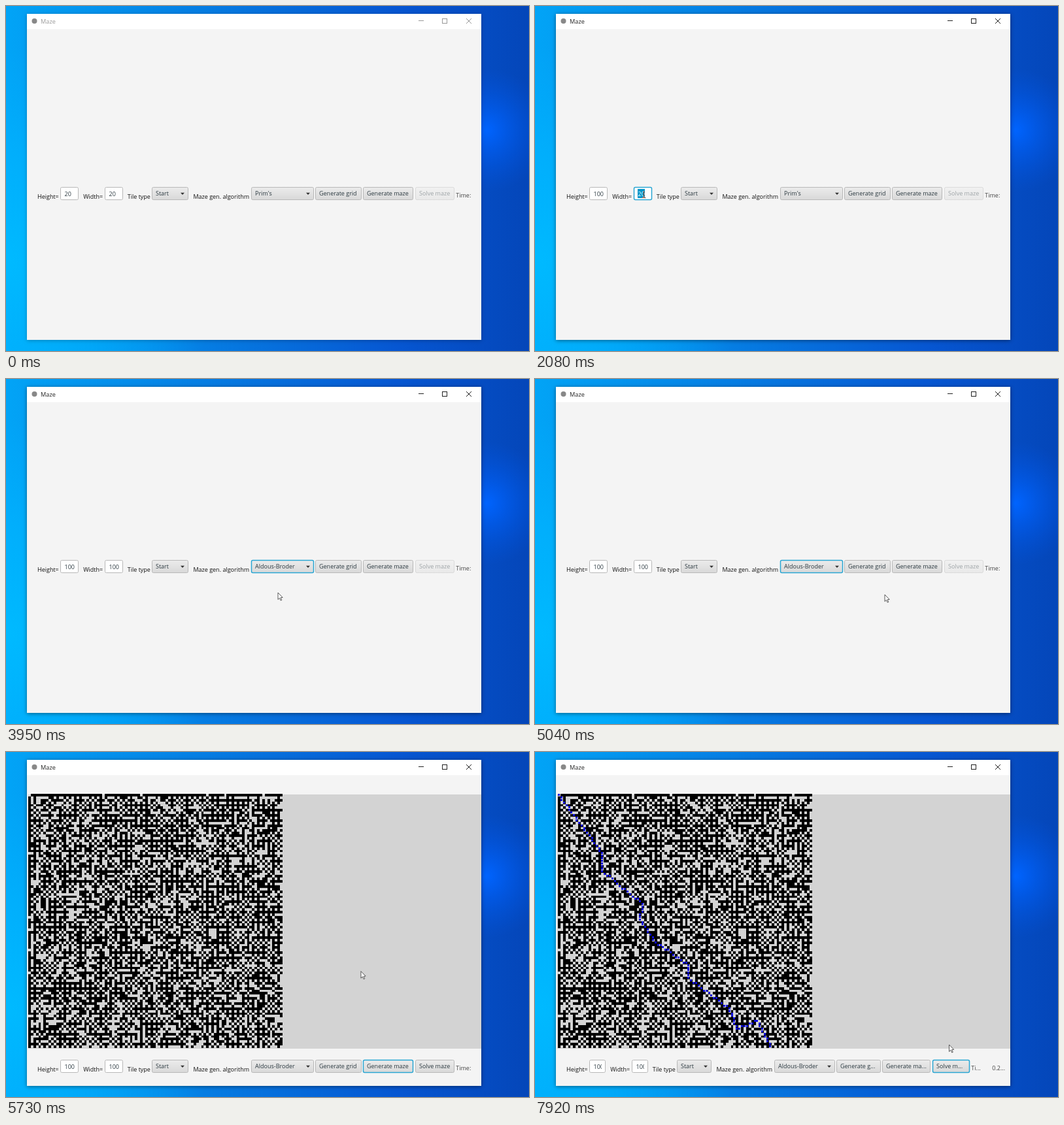
These frames come from a looping animation (800 by 528 pixels, 8 s). An HTML page with a canvas:

```html
<!DOCTYPE html>
<html lang="en">
<head>
<meta charset="utf-8">
<title>Maze</title>
<style>
html, body { margin: 0; width: 100%; height: 100%; overflow: hidden; }
canvas { display: block; }
</style>
</head>
<body>
<canvas id="stage" width="800" height="528"></canvas>
<script>
const LOOP = 8000, CELL = 3.89, SIZE = 100, GAP = 2.5;
const ACTIVATED = 70, WIDTH_FOCUS = 1680, POPUP_OPEN = 3360, POPUP_CLOSE = 3790;
const GENERATE_PRESS = 5330, GENERATED = 5730, SOLVE_PRESS = 6800, SOLVED = 7360;
const ACCENT = '#2aa6d3', HIGHLIGHT = '#0096c9', INK = '#2b3940', FLOOR = '#d3d3d3';
const c = document.getElementById('stage').getContext('2d');

// Pointer moves: start time, end time, destination
const POINTER_START = [100, 288];
const MOVES = [
  [1250, 1610, 166, 288],
  [2450, 2870, 601, 324],
  [2930, 3330, 460, 288],
  [3470, 3750, 416, 327],
  [3980, 4400, 535, 330],
  [5040, 5250, 575, 290],
  [5450, 5650, 545, 330],
  [5650, 5810, 541, 341],
  [5810, 6100, 520, 400],
  [6100, 6700, 650, 480],
  [7700, 7920, 633.5, 448]
];

// Bends of the solution, in maze cells
const BENDS = [[0, 0], [17, 23], [17, 30], [33, 43], [32, 49], [38, 58], [51, 67],
  [51, 72], [67, 84], [70, 92], [78, 89], [83, 99]];

function font(size = 9) {
  c.font = `${size}px "Open Sans", "Noto Sans", sans-serif`;
}

function text(label, x, y, color = INK, size) {
  font(size);
  c.fillStyle = color;
  c.fillText(label, x, y);
}

function textWidth(label) {
  font();
  return c.measureText(label).width;
}

function ellipsize(label, width) {
  if (textWidth(label) <= width) return label;
  while (textWidth(label + '...') > width) label = label.slice(0, -1);
  return label + '...';
}

function fillRect(x, y, w, h, color) {
  c.fillStyle = color;
  c.fillRect(x, y, w, h);
}

function trace(points) {
  c.beginPath();
  points.forEach(([x, y]) => c.lineTo(x, y));
}

function line(points, color) {
  trace(points);
  c.strokeStyle = color;
  c.lineWidth = 1;
  c.stroke();
}

function frameBox(x, y, w, fill, focused) {
  c.beginPath();
  c.roundRect(x + 0.5, y + 0.5, w - 1, 19, 2);
  c.fillStyle = fill;
  c.fill();
  c.strokeStyle = focused ? ACCENT : '#b8b8b8';
  c.lineWidth = focused ? 1.5 : 1;
  c.stroke();
}

function layerOf(paint) {
  const layer = document.createElement('canvas');
  layer.width = layer.height = Math.ceil(SIZE * CELL);
  const g = layer.getContext('2d');
  paint((x, y, color) => {
    const left = Math.round(x * CELL), top = Math.round(y * CELL);
    g.fillStyle = color;
    g.fillRect(left, top, Math.round((x + 1) * CELL) - left, Math.round((y + 1) * CELL) - top);
  }, g);
  return layer;
}

// Rooms sit on odd cells; pillars and links between them open at random.
const maze = layerOf(fillCell => {
  let seed = 20;
  const random = () => (seed = (seed * 16807) % 2147483647) / 2147483647;
  for (let y = 0; y < SIZE; y++) {
    for (let x = 0; x < SIZE; x++) {
      const chance = !x || !y ? 0.06 : (x + y) % 2 ? 0.18 : x % 2 ? 0.95 : 0.42;
      if (random() > chance) fillCell(x, y, '#000');
    }
  }
});

const route = layerOf((fillCell, g) => {
  g.fillStyle = '#1010dc';
  for (let i = 1; i < BENDS.length; i++) {
    const [ax, ay] = BENDS[i - 1], [bx, by] = BENDS[i];
    const steps = Math.max(Math.abs(bx - ax), Math.abs(by - ay));
    for (let s = 0; s <= steps; s++) {
      const x = Math.round(ax + (bx - ax) * s / steps), y = Math.round(ay + (by - ay) * s / steps);
      g.fillRect(Math.round(x * CELL), Math.round(y * CELL), 3, 3);
    }
  }
});

function gradient(g, ...colors) {
  colors.forEach((color, i) => g.addColorStop(i / (colors.length - 1), color));
  return g;
}

function drawDesktop() {
  const glow = (x, y, r, ...colors) =>
    fillRect(0, 0, 800, 528, gradient(c.createRadialGradient(x, y, 0, x, y, r), ...colors));
  fillRect(0, 0, 800, 528, gradient(c.createLinearGradient(0, 0, 800, 0),
    '#02a4f6', '#048bea', '#0670dd', '#0656d2', '#0446b9'));
  glow(0, 390, 330, '#00baff', '#00b4ffb0', '#00b0ff00');
  glow(735, 190, 95, '#0064ff', '#005cf080', '#0054e000');
}

function drawWindow(active) {
  c.save();
  c.shadowColor = active ? '#0007' : '#0004';
  c.shadowBlur = 6;
  c.shadowOffsetY = 1;
  fillRect(32, 12, 695, 499, '#f4f4f4');
  c.restore();
  fillRect(32, 12, 695, 23.5, '#fff');

  const color = active ? '#222' : '#999';
  c.fillStyle = '#888';
  c.beginPath();
  c.arc(43.5, 23, 4, 0, 7);
  c.fill();
  text('Maze', 53, 26.5, color, 9.2);
  line([[631, 22.5], [639, 22.5]], color);
  line([[704, 19], [712, 27]], color);
  line([[712, 19], [704, 27]], color);
  c.strokeRect(667.5, 19.5, 7, 7);
}

function field(x, y, w, value, { focused, selected }) {
  frameBox(x, y, w, '#fff', focused);
  c.save();
  c.beginPath();
  c.rect(x + 6, y, w - 12, 20);
  c.clip();
  if (selected) fillRect(x + 6, y + 3, 11, 14, HIGHLIGHT);
  text(value, x + 6.5, y + 13.5, selected ? '#fff' : INK);
  c.restore();
}

function button(x, y, w, label, { focused, hover, disabled, pressed, combo }) {
  const shades = pressed ? ['#d2d2d2', '#c6c6c6'] : hover ? ['#f6f6f6', '#e4e4e4'] : ['#ececec', '#d8d8d8'];
  c.globalAlpha = disabled ? 0.4 : 1;
  frameBox(x, y, w, gradient(c.createLinearGradient(0, y, 0, y + 20), ...shades), focused);
  text(combo ? label : ellipsize(label, w - 12), x + 6, y + 13.3);
  if (combo) {
    trace([[x + w - 12, y + 8.7], [x + w - 6, y + 8.7], [x + w - 9, y + 12]]);
    c.fillStyle = '#333';
    c.fill();
  }
  c.globalAlpha = 1;
}

function typed(t, start) {
  return t < start ? '20' : '100'.slice(0, 1 + Math.floor((t - start) / 130));
}

// Lays the controls out left to right; every box shrinks once the time is shown.
function drawControls(t, px, py) {
  const solved = t >= SOLVED, generated = t >= GENERATED;
  const y = generated ? 471 : 277, shrink = solved ? 3 : 0;
  const within = (a, b) => t >= a && t < b;
  let x = 48;

  const label = (value, indent = 4.5) => {
    text(value, x + indent, y + 17.5, '#111');
    x += indent + textWidth(value) + GAP;
  };
  const place = (draw, width, value, state = {}) => {
    const left = Math.round(x), w = Math.round(width - shrink);
    state.hover = px >= left && px < left + w && py >= y && py < y + 20;
    draw(left, y, w, value, state);
    x += width - shrink + GAP;
  };
  const push = (value, state) => place(button, textWidth(value) + 13, value, state);

  label('Height=', 0);
  place(field, 28, typed(t, 920),
    { focused: within(ACTIVATED, WIDTH_FOCUS), selected: within(620, 920) });
  label('Width=');
  place(field, 28, typed(t, 2150),
    { focused: within(WIDTH_FOCUS, POPUP_OPEN), selected: within(1770, 2150) });
  label('Tile type');
  place(button, 56, 'Start', { combo: true });
  label('Maze gen. algorithm');
  place(button, 96, t < POPUP_CLOSE ? "Prim's" : 'Aldous-Broder',
    { combo: true, focused: within(POPUP_OPEN, GENERATE_PRESS) });
  push('Generate grid');
  push('Generate maze', {
    focused: within(GENERATE_PRESS, SOLVE_PRESS), pressed: within(GENERATE_PRESS, GENERATE_PRESS + 100)
  });
  push('Solve maze', {
    focused: t >= SOLVE_PRESS, pressed: within(SOLVE_PRESS, SOLVE_PRESS + 120), disabled: !generated
  });
  text(solved ? 'Ti...' : 'Time:', x, y + 16, '#444');
  if (solved) text('0.2...', x + 32, y + 16, '#444');
}

function drawPopup(py) {
  c.save();
  c.shadowColor = '#0006';
  c.shadowBlur = 3;
  fillRect(376, 298, 96, 45, '#fff');
  c.restore();
  ["Prim's", 'Aldous-Broder'].forEach((label, i) => {
    const hovered = i === (py >= 320 ? 1 : 0);
    if (hovered) fillRect(377, 299 + i * 22, 94, 21, HIGHLIGHT);
    text(label, 382, 313 + i * 22, hovered ? '#fff' : INK);
  });
}

function drawMaze(solved) {
  const x = solved ? 35 : 34;
  fillRect(34, 65, 693, 389, FLOOR);
  c.drawImage(maze, x, 64);
  if (solved) c.drawImage(route, x, 64);
}

function pointerAt(t) {
  return MOVES.reduce(([px, py], [start, end, x, y]) => {
    const k = Math.min(1, Math.max(0, (t - start) / (end - start)));
    const eased = k * k * (3 - 2 * k);
    return [px + (x - px) * eased, py + (y - py) * eased];
  }, POINTER_START);
}

function drawPointer(t, x, y) {
  const overField = y < 297 && x < 181;
  c.save();
  c.translate(x, y);
  if (!overField) {
    trace([[0, 0], [0, 10.5], [2.4, 8.2], [4.2, 12], [5.8, 11.3], [4.1, 7.7], [7.2, 7.4]]);
    c.closePath();
    c.fillStyle = '#fff';
    c.fill();
    c.strokeStyle = '#333';
    c.lineWidth = 0.8;
    c.stroke();
  } else if (t > 1610) {
    c.globalCompositeOperation = 'difference';
    line([[0.5, -5], [0.5, 5]], '#fff');
    line([[-2, 5.5], [3, 5.5]], '#fff');
  }
  c.restore();
}

function frame(now) {
  const t = now % LOOP, [px, py] = pointerAt(t);
  drawDesktop();
  drawWindow(t >= ACTIVATED);
  if (t >= GENERATED) drawMaze(t >= SOLVED);
  drawControls(t, px, py);
  if (t >= POPUP_OPEN && t < POPUP_CLOSE) drawPopup(py);
  drawPointer(t, px, py);
  requestAnimationFrame(frame);
}
requestAnimationFrame(frame);
</script>
</body>
</html>
```
